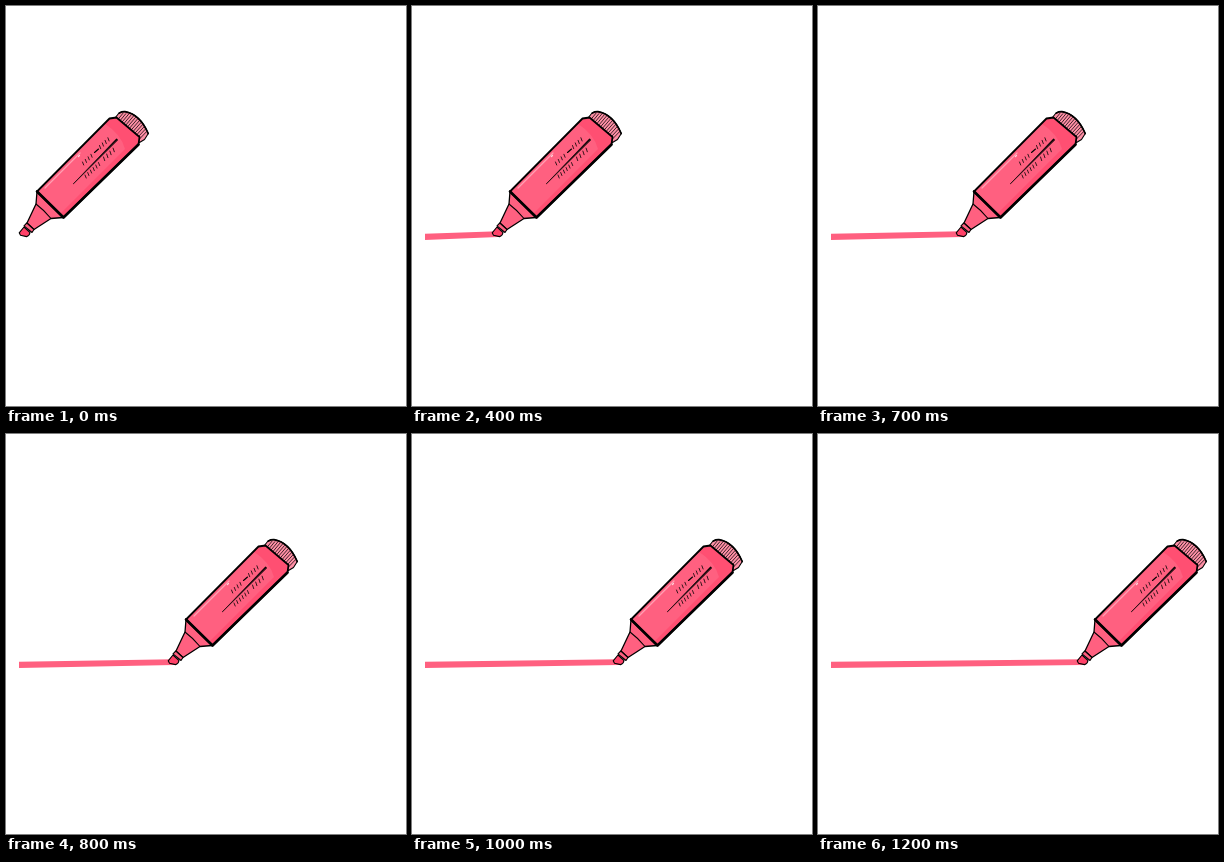
An HTML page that plays this animation: 400x400 px, repeating every 1300 ms.

```html
<!DOCTYPE html>
<html lang="en">
<head>
<meta charset="utf-8">
<title>Highlighter stroke</title>
<style>
  @property --x { syntax: "<number>"; inherits: true; initial-value: 0; }
  html, body { margin: 0; width: 100%; height: 100%; overflow: hidden; background: #fff; }
  svg { display: block; width: 100%; height: 100%; animation: draw 1300ms step-end infinite; }
  #pen { transform: translateX(calc(var(--x) * 1px)); }
  /* stays empty while the pen is at rest */
  #stroke { transform: translate(13px, 0) scaleX(min(var(--x) * 9, var(--x) + 6)); }
  @keyframes draw {
    0% { --x: 0; }
    7.6923% { --x: 14; }
    15.3846% { --x: 28.3; }
    23.0769% { --x: 47.5; }
    30.7692% { --x: 67; }
    38.4615% { --x: 86.3; }
    46.1538% { --x: 105.5; }
    53.8462% { --x: 125; }
    61.5385% { --x: 149; }
    69.2308% { --x: 168.5; }
    76.9231% { --x: 188; }
    84.6154% { --x: 217; }
    92.3077%, 100% { --x: 246; }
  }
</style>
</head>
<body>
<svg viewBox="0 0 400 400">
  <defs>
    <path id="body" d="M31 185.500 L103.500 112.500 L110.500 111.500 L133.500 131 L132.500 138.500 L57.500 211.500Z"/>
  </defs>
  <polygon id="stroke" points="0,227.800 1,225.200 1,231 0,234" fill="#ff6080"/>
  <g id="pen" stroke="#000" stroke-linejoin="round" stroke-linecap="round" fill="none">
    <path d="M109 112 L113 107 Q115 105.500 119 105.500 Q134 108 142.300 127.500 L138.500 133.500 L133.500 136.500Z" fill="#ff8fa6" stroke-width="1.1"/>
    <path id="ribs" stroke-width=".75"/>
    <path d="M113.500 107 Q116 105.500 119 105.700 Q134 108.500 142.200 127.500" stroke-width="1.700"/>

    <path d="M31 185.500 L30 198 L21 217 L28 223.500 L45 212.500 L57 211.500Z" fill="#ff6080" stroke-width="1.300"/>
    <path d="M30 198 Q38 204 45 212.500" stroke-width="1.1"/>
    <path d="M20.800 217 L28 223.500 L26 226.500 L18 219.800Z" fill="#ff6080" stroke-width="1.1"/>
    <path d="M18 221 L24 226.500 Q23.500 230 20.500 230.600 L14.500 229.300 L13.200 226.800Z" fill="#ff4168" stroke-width="1.1"/>

    <use href="#body" fill="#ff6080" stroke="none"/>
    <path d="M98.500 117.500 L103.500 112.500 L110.500 111.500 L133.500 131 L132.500 138.500 L57.500 211.500 L54 208 L119 143 Q115 128 98.500 117.500Z" fill="#ff4f72" stroke="none"/>
    <path d="M39 182 L74 147" stroke="#ff9fb1" stroke-width="1.200"/>
    <path d="M72.500 150.500 L73.500 149.500" stroke="#ffd0d8" stroke-width="1.200"/>
    <use href="#body" stroke-width="1.800"/>
    <path d="M31 185.500 L57.500 211.500 L132.500 138.500" stroke-width="2.600"/>

    <path d="M67.500 177.700 L110.500 132.800 L111.600 133.800Z" fill="#000" stroke-width=".6"/>
    <path d="M88.500 146.500 L92.500 143" stroke-width="1.100"/>
    <path id="marks" stroke-width=".8"/>
  </g>
</svg>
<script>
  const mix = (a, b, t) => a + (b - a) * t;

  let ribs = "";
  for (let i = 1; i < 14; i++) {
    const t = i / 14, bulge = 4 * t * (1 - t);
    ribs += `M${mix(110, 134, t)} ${mix(112, 136, t)}` +
      `L${mix(114, 141, t) + bulge * 4} ${mix(107, 129, t) - bulge * 5}`;
  }
  document.getElementById("ribs").setAttribute("d", ribs);

  const ticks = (x, y, count, gap, len) =>
    Array.from({ length: count }, (_, i) =>
      `M${x + i * gap} ${y - i * gap * 0.92}l1.2 ${len}`).join("");
  document.getElementById("marks").setAttribute("d",
    ticks(76.5, 156, 4, 2.8, 3) +
    ticks(93.5, 139.5, 4, 2.8, 3.2) +
    ticks(79, 169, 6, 2.7, 3) +
    ticks(97.5, 151, 4, 3.2, 3.6));
</script>
</body>
</html>
```
